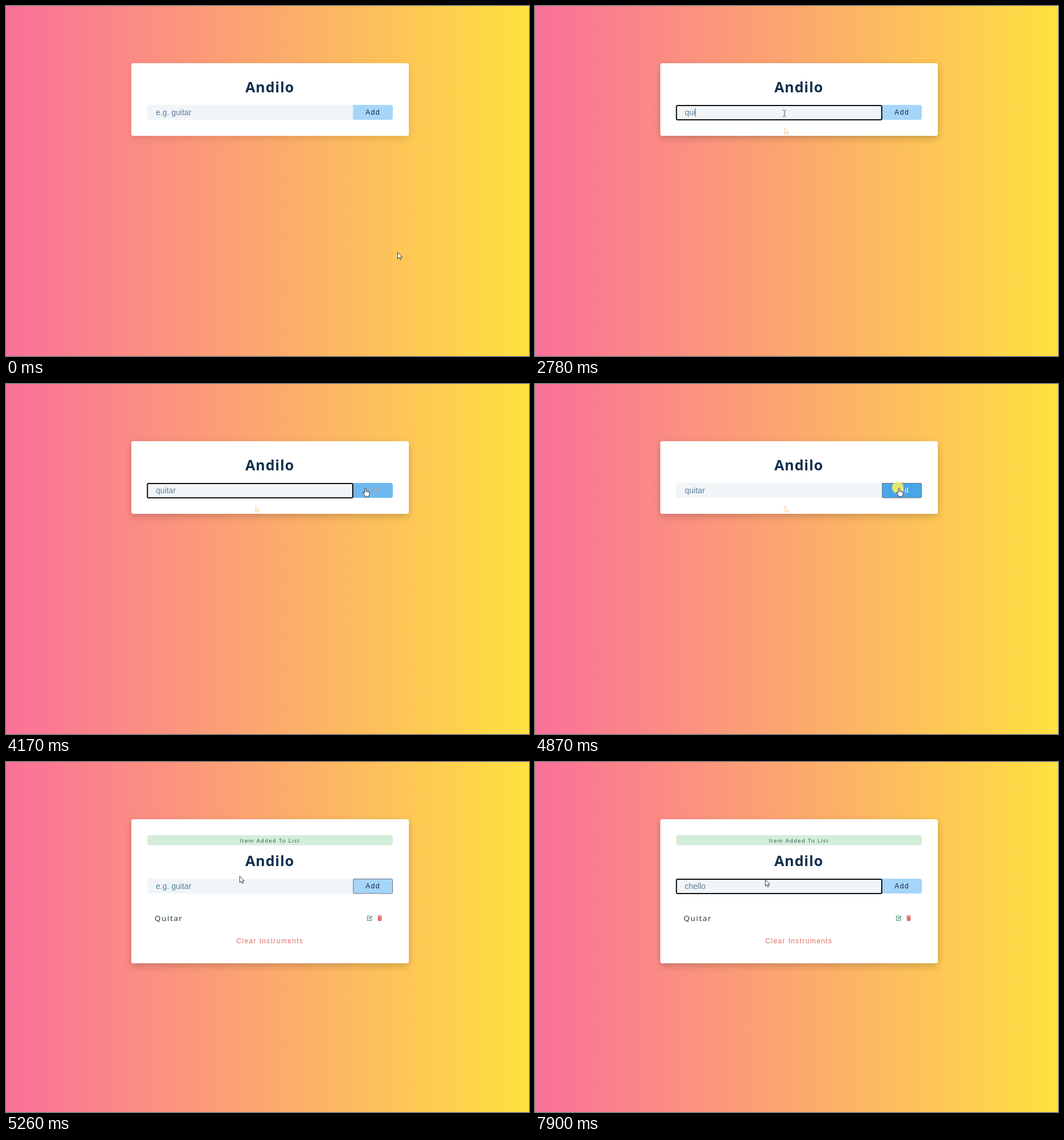
An HTML page that plays this animation: 914x612 px, repeating every 7990 ms.

```html
<!DOCTYPE html>
<html lang="en">
<head>
<meta charset="utf-8">
<title>Instrument list</title>
<style>
  html, body { margin: 0; width: 100%; height: 100%; overflow: hidden; }
  body { background: linear-gradient(to right, #fa709a, #fee140); }
  #card { position: absolute; left: 219px; top: 100px; width: 485px; border-radius: 3.5px; background: #fff; }
  svg { position: absolute; left: 0; top: 0; }
  text { white-space: pre; }
  .ui { font-family: "Open Sans", "Noto Sans", sans-serif; }
  .form { font-family: "Liberation Sans", Arial, sans-serif; }
  .mid { text-anchor: middle; }
</style>
</head>
<body>
<div id="card"></div>
<svg width="914" height="612" viewBox="0 0 914 612">
  <defs>
    <path id="arrowShape" d="M.5 .5V12L3.2 9.5L4.9 13.3L6.7 12.5L5 8.9H8.4Z"/>
  </defs>

  <g id="list">
    <rect x="247" y="128" width="429" height="17.5" rx="3.5" fill="#d4edda"/>
    <text class="ui mid" x="461.3" y="140.6" font-size="9.5" letter-spacing="1.3" fill="#2c5a50">Item Added To List</text>
    <text class="ui" x="259.8" y="277.6" font-size="13.4" letter-spacing="1.6" fill="#1b2f3a">Quitar</text>
    <g fill="none" stroke="#5f9f7c" stroke-width="1.3">
      <path d="M636 269.4H631.6V277.2H638.8V273.6"/>
      <path d="M634.4 274.6L639.6 269.2" stroke-width="2.2"/>
    </g>
    <path fill="#dd6a66" d="M649 268.8H651.3L651.9 268H654.3L654.9 268.8H657.2V270.1H649ZM649.6 270.8H656.6L656.1 277.1Q656 278 655.1 278H651.1Q650.2 278 650.1 277.1Z"/>
    <text class="form mid" x="461.3" y="317.3" font-size="11.9" letter-spacing="1.38" fill="#df6c66">Clear Instruments</text>
  </g>

  <g id="main">
    <text class="ui mid" x="461" y="150.6" font-size="25" font-weight="700" letter-spacing=".9" fill="#102f4c">Andilo</text>
    <path d="M250.5 173H606.5V199H250.5Q247 199 247 195.5V176.5Q247 173 250.5 173Z" fill="#f1f5f8"/>
    <path id="button" d="M606.5 173H672.5Q676 173 676 176.5V195.5Q676 199 672.5 199H606.5Z"/>
    <text id="add" class="form mid" x="641.3" y="189.8" font-size="12.1" letter-spacing="1.6">Add</text>
    <rect id="buttonRing" x="607" y="173.5" width="68.5" height="25.5" rx="2" fill="none" stroke="#6f7480"/>
    <rect id="inputRing" x="247.2" y="174" width="358.8" height="25" rx="2" fill="none" stroke="#101010" stroke-width="2"/>
    <text id="field" class="form" x="261.8" y="191" font-size="14"></text>
    <rect id="caret" y="179" width="1" height="15" fill="#617d98"/>
  </g>

  <use id="ghost" href="#arrowShape" x="435.5" y="212.5" fill="#fff6ec" stroke="#f7cfa0" stroke-width=".9"/>
  <circle id="press" r="10.2" fill="#f8f45c" fill-opacity=".85"/>
  <g id="arrow" class="cursor"><use href="#arrowShape" fill="#fff" stroke="#26262c" stroke-width=".9"/></g>
  <g id="beam" class="cursor" fill="none" stroke="#3a3f46" stroke-width="1">
    <path d="M-2.8 -5.5H-.8M.8 -5.5H2.8M0 -5V5M-2.8 5.5H-.8M.8 5.5H2.8"/>
  </g>
  <g id="hand" class="cursor">
    <path fill="#fff" stroke="#26262c" stroke-width=".95" stroke-linejoin="round"
      d="M-1.2 1.2Q-1 0 0 0Q1.2 0 1.2 1.2V5Q2.8 4.2 3.6 5.6Q5 4.8 5.6 6.2Q7.2 5.8 7.2 7.6V10.4Q7 12.4 6 13.2V15H-.4V13.4Q-2.2 11.8 -3.6 9Q-4.4 7.6 -3.4 7.2Q-2.3 7 -1.2 8.8Z"/>
    <path fill="none" stroke="#26262c" stroke-width=".6" d="M1.3 5V7.6M3.6 5.8V7.8M5.5 6.4V8"/>
  </g>
</svg>
<script>
const LOOP = 7990;
const LISTED = 4950;       // the new item appears
const SHIFT = 31;          // room taken by the alert
const FIELD_X = 261.8;
const el = id => document.getElementById(id);

// time, cursor shape, hot spot
const moves = [
  [0, 'arrow', 684, 430], [70, 'arrow', 640, 408], [140, 'arrow', 512, 339], [210, 'arrow', 412, 285],
  [360, 'arrow', 436, 213], [440, 'beam', 436, 187.8],
  [3710, 'arrow', 452, 163], [3790, 'arrow', 496, 137], [3870, 'arrow', 556, 133],
  [3945, 'arrow', 598, 155], [4020, 'hand', 618, 176], [4095, 'hand', 625, 182], [4170, 'hand', 628, 182],
  [4245, 'hand', 633, 182], [4320, 'hand', 636, 182],
  [4950, 'arrow', 636, 182], [5030, 'arrow', 622, 184], [5100, 'arrow', 560, 190],
  [5180, 'arrow', 476, 196], [5260, 'arrow', 408, 199],
  [5410, 'beam', 392, 220], [5490, 'beam', 382.5, 223], [5640, 'beam', 378.5, 223],
  [7900, 'arrow', 402, 205]
];

const typing = [
  { word: 'quitar', keys: [2300, 2470, 2780, 3080, 3250, 3480], end: LISTED },
  { word: 'chello', keys: [6650, 6800, 6970, 7120, 7270, 7350], end: LOOP }
];

const focused = [[840, 4870], [6110, LOOP]];
const caretOn = [[840, 1370], [1920, 4020], [4490, 4870], [6110, 7900]];
const presses = [[840, 910], [4870, 4950], [6110, 6190]];

const within = (t, spans) => spans.some(([a, b]) => t >= a && t < b);
const show = (id, on) => el(id).setAttribute('visibility', on ? 'visible' : 'hidden');

// linear transition shown in five held steps
const fade = (t, start, end) =>
  Math.max(0, Math.min(1, Math.floor((t - start) / (end - start) * 5 + 1e-6) / 5));

const mix = (a, b, k) => `rgb(${a.map((v, i) => Math.round(v + (b[i] - v) * k))})`;

function typed(t) {
  const run = typing.find(r => t >= r.keys[0] && t < r.end);
  return run ? run.word.slice(0, run.keys.filter(k => k <= t).length) : '';
}

function render(t) {
  const listed = t >= LISTED;
  const lift = fade(t, 283, 670);
  const card = el('card');
  card.style.height = (listed ? 252 : 127) + 'px';
  card.style.boxShadow = `0 4.4px 13px rgba(0,0,0,${0.1 + 0.1 * lift})`;
  show('list', listed);
  el('main').setAttribute('transform', `translate(0 ${listed ? SHIFT : 0})`);

  const hover = listed ? 1 - fade(t, LISTED, 5260) : fade(t, 3945, 4320);
  el('button').setAttribute('fill', mix([165, 213, 248], [73, 166, 233], hover));
  el('add').setAttribute('fill', mix([21, 37, 66], [255, 255, 255], hover));
  show('buttonRing', t >= 4870 && t < 6110);
  show('inputRing', within(t, focused));

  const word = typed(t);
  const field = el('field');
  field.textContent = word || 'e.g. guitar';
  field.setAttribute('fill', word ? '#617d98' : listed ? '#4f839b' : '#647c9f');
  const end = word ? field.getComputedTextLength() : 0;
  el('caret').setAttribute('x', Math.round(FIELD_X + end));
  show('caret', within(t, caretOn));
  show('ghost', t >= 440 && !listed);

  const [, shape, x, y] = moves.filter(m => m[0] <= t).pop();
  for (const id of ['arrow', 'beam', 'hand']) show(id, id === shape);
  el(shape).setAttribute('transform', `translate(${x} ${y})`);
  show('press', within(t, presses));
  el('press').setAttribute('cx', x - 2);
  el('press').setAttribute('cy', y - 1);
}

const begin = performance.now();
function tick() {
  render((performance.now() - begin) % LOOP);
  requestAnimationFrame(tick);
}
tick();
</script>
</body>
</html>
```
